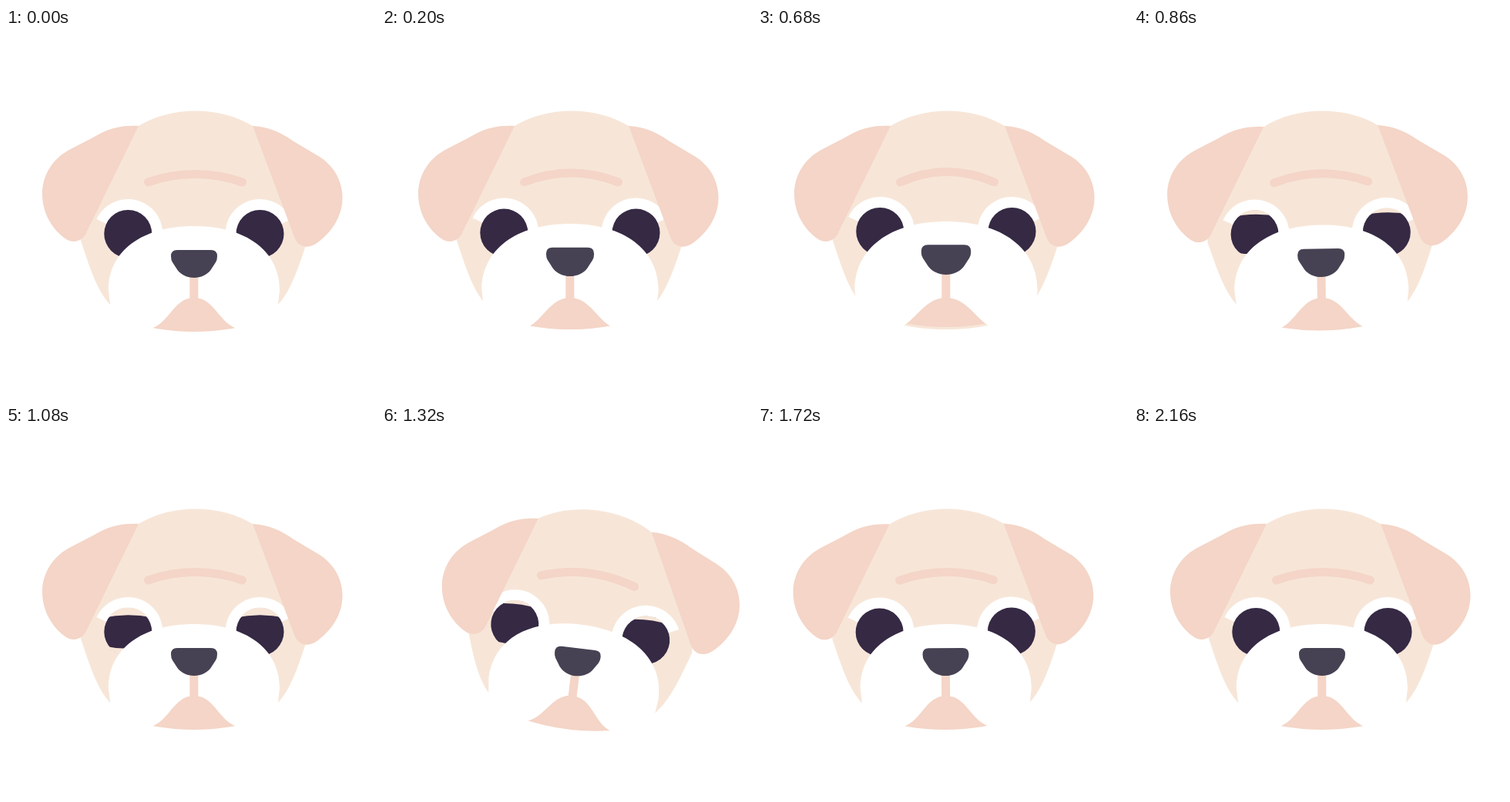
Recreate the animation shown at these times as an HTML page with a canvas. Size 480 by 480 pixels, loop 2.18 s.

```html
<!DOCTYPE html>
<html>
<head>
<meta charset="utf-8">
<style>
html, body { margin: 0; width: 100%; height: 100%; overflow: hidden; background: #fff; }
canvas { display: block; }
</style>
</head>
<body>
<canvas id="stage" width="480" height="480"></canvas>
<script>
const ctx = document.getElementById('stage').getContext('2d');
const LOOP = 2180, STEP = 20;
const CREAM = '#f7e6d8', PINK = '#f4d5c7', PUPIL = '#352944', NOSE = '#474253';

// [time, value] keys, eased with a cosine between them
const TILT = [[0, 0], [680, 0], [970, -1.3], [1420, 8], [1800, -1.3], [2140, 0]];
const SNIFF = [[0, 0], [500, 1.06], [1000, 0]];
const LID = [[680, 0], [1000, 10.5], [1680, 0]];

const HEAD = new Path2D('M97 276C98 210 125 150 172 127C215 101 277 101 320 127' +
  'C364 150 390 210 391 276C380 308 371 340 352 360C323 385 283 391 244 391' +
  'C205 391 165 385 136 360C117 340 108 308 97 276Z');
const LEFT_EAR = new Path2D('M172 127C150 126 133 130 113 142L84 157' +
  'C62 168 47 190 47 215C47 242 62 263 78 274C88 280 98 276 103 268Z');
const RIGHT_EAR = new Path2D('M320 127C340 128 358 136 373 147L405 166' +
  'C425 178 436.5 198 436.5 220C436.5 243 424 263 406 277C393 288 379 285 374 271Z');
const SNOUT = new Path2D('M-22-18H22Q30-18 30-10Q30-5 28-2L21.5 8C17 14 9 18 0 18' +
  'C-9 18-17 14-21.5 8L-28-2Q-30-5-30-10Q-30-18-22-18Z');

function track(keys, t) {
  const i = keys.findIndex(k => k[0] > t);
  if (i < 0) return keys[keys.length - 1][1];
  if (!i) return keys[0][1];
  const [t0, a] = keys[i - 1], [t1, b] = keys[i];
  return a + (b - a) * (1 - Math.cos(Math.PI * (t - t0) / (t1 - t0))) / 2;
}

function fill(color, path) {
  ctx.fillStyle = color;
  path ? ctx.fill(path) : ctx.fill();
}

function rotateAt(x, y, deg) {
  ctx.translate(x, y);
  ctx.rotate(deg * Math.PI / 180);
  ctx.translate(-x, -y);
}

function ear(path, x, turn) {
  ctx.save();
  rotateAt(x, 127, turn);
  fill(PINK, path);
  ctx.restore();
}

function eye(x, y, side, upper, lower) {
  ctx.save();
  ctx.translate(x, y);
  ctx.scale(side, 1);
  const rad = Math.PI / 180;
  ctx.beginPath();
  ctx.moveTo(0, 0);
  ctx.arc(0, 0, 45, 205 * rad, 400 * rad);
  fill('#fff');
  ctx.beginPath();
  ctx.arc(0, 0, 31, 0, 7);
  fill(PUPIL);
  ctx.beginPath();
  ctx.arc(0, 0, 31.6, 0, 7);
  ctx.clip();
  for (const lid of [upper, lower]) {
    const edge = lid - 31;
    if (lid > 0.2) fill(CREAM, new Path2D(`M-34-34H34V${edge + 3}Q0 ${edge - 5}-34 ${edge + 3}Z`));
    ctx.scale(1, -1);
  }
  ctx.restore();
}

function brow(k) {
  ctx.strokeStyle = PINK;
  ctx.lineWidth = 11;
  ctx.lineCap = 'round';
  ctx.stroke(new Path2D(`M184.5 200Q245 ${179 - 8 * k} 306.5 200`));
}

function muzzle(k) {
  const drop = -8 * k;
  fill(PINK, new Path2D(`M144 340V${377 + drop}Q244 ${411 + drop} 344 ${377 + drop}V340Z`));

  // dome with an arch cut out for the chin
  const w = 111 + 10 * k, h = 83 + 8 * k, round = 0.61;
  const foot = 60 + 4 * k, mid = 32 + 9 * k, bend = 386 - 8 * k;
  ctx.beginPath();
  ctx.moveTo(244 - w, 340);
  ctx.bezierCurveTo(244 - w, 340 - h * round, 244 - w * round, 340 - h, 244, 340 - h);
  ctx.bezierCurveTo(244 + w * round, 340 - h, 244 + w, 340 - h * round, 244 + w, 340);
  ctx.lineTo(237 + w, 402);
  ctx.lineTo(244 + foot, 402);
  ctx.lineTo(244 + foot, 391);
  ctx.bezierCurveTo(244 + mid, bend, 272, 350, 244, 350);
  ctx.bezierCurveTo(216, 350, 244 - mid, bend, 244 - foot, 391);
  ctx.lineTo(244 - foot, 402);
  ctx.lineTo(251 - w, 402);
  fill('#fff');

  ctx.fillStyle = PINK;
  ctx.fillRect(238.3, 312, 11, 42);
  ctx.save();
  ctx.translate(244, 306 - 7 * k);
  ctx.scale(1 + 0.1 * k, 1 + 0.1 * k);
  fill(NOSE, SNOUT);
  ctx.restore();
}

function draw(t) {
  const tilt = track(TILT, t), k = track(SNIFF, t), lid = track(LID, t);
  ctx.fillStyle = '#fff';
  ctx.fillRect(0, 0, 480, 480);
  ctx.save();
  rotateAt(246, 378, tilt);
  fill(CREAM, HEAD);
  brow(k);
  eye(158.3, 267 - 4 * k, 1, lid, lid);
  eye(329.5, 267 - 4 * k, -1, lid, 0);
  muzzle(k);
  // ears stay almost level while the head tilts
  ear(LEFT_EAR, 172, -tilt);
  ear(RIGHT_EAR, 320, -0.8 * tilt);
  ctx.restore();
}

const start = performance.now();
function frame() {
  const t = (performance.now() - start) % LOOP;
  draw(Math.floor(t / STEP) * STEP);
  requestAnimationFrame(frame);
}
frame();
</script>
</body>
</html>
```
